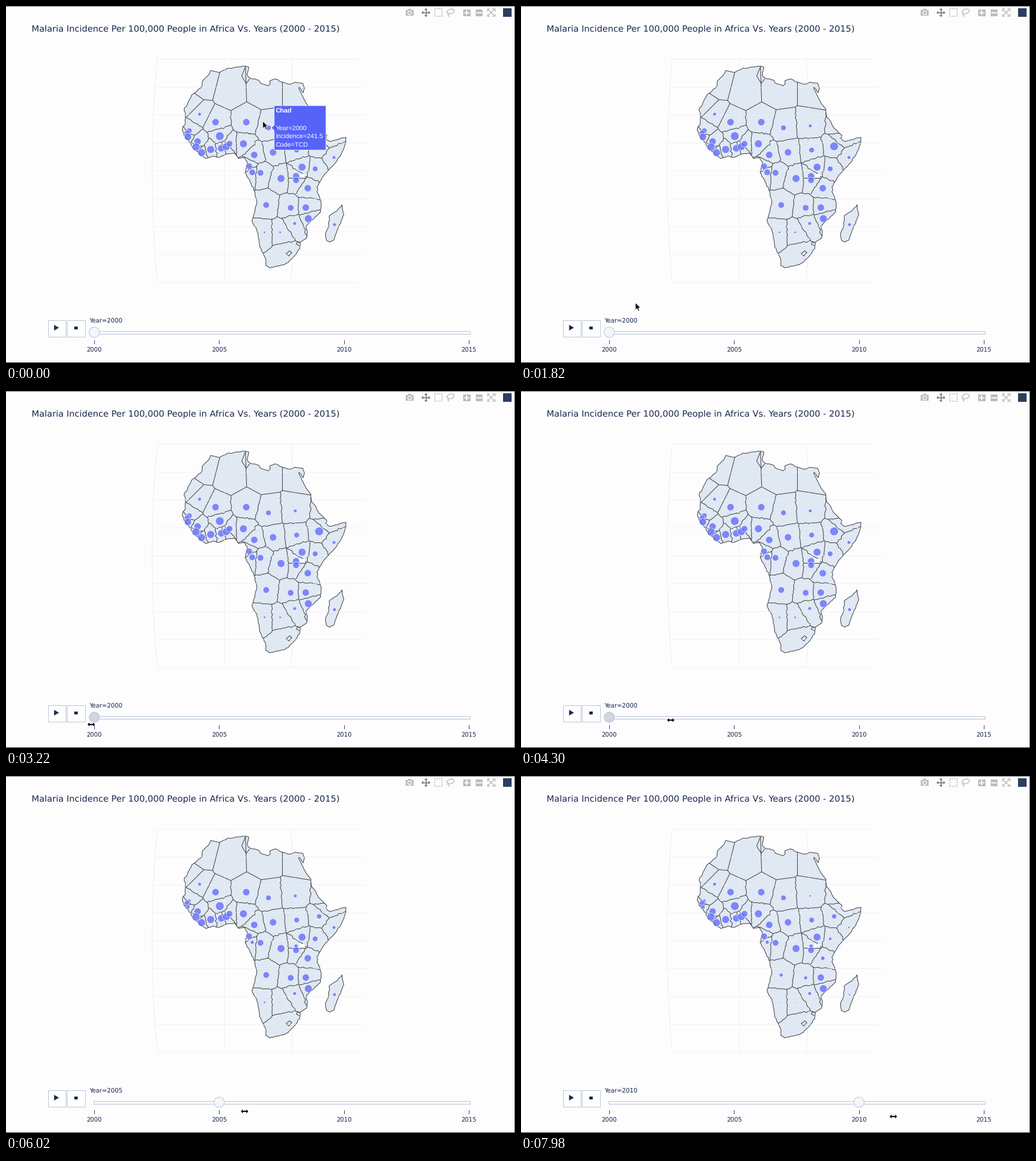
Recreate the animation shown at these times as a matplotlib script. Size 894 px wide and 627 px high, loop 8000 ms.

```python
from itertools import combinations

import numpy as np
import matplotlib.pyplot as plt
from matplotlib.animation import FuncAnimation
from matplotlib.collections import LineCollection
from matplotlib.patches import Circle, Ellipse, Polygon, Rectangle

plt.rcParams["text.hinting"] = "no_hinting"
W, H, DPI = 894, 627, 64
STEP, LOOP = 40, 8000
PT = 72 / DPI
INK, PALE, LAND, BORDER = "#182850", "#b8c4d8", "#dfe8f3", "#383838"
BLUE, GREY = "#5663f9", "#bcbcbe"
rng = np.random.default_rng(4)

# Key points of the coast: longitude, latitude
COAST_EAST = [
    -5.9, 35.8, -2, 35.1, 1.5, 36.6, 9.8, 37.3, 11, 37, 10.2, 34.3, 11.3, 33.1,
    15.2, 32.3, 15.8, 31.3, 19.1, 30.3, 20.1, 31, 20, 32.1, 22.5, 32.8, 25, 31.7,
    29, 30.9, 31, 31.6, 34.3, 31.2, 34.9, 29.5, 34.2, 27.8, 32.4, 29.9,
    34.1, 26.1, 35.6, 23.6, 37, 22, 37.2, 19.2, 38.4, 18, 39.8, 15.4, 43.2, 12.6,
    42.8, 11.6, 44.3, 10.4, 47, 11, 51.2, 11.9, 50.6, 9.2, 48.6, 5.3, 46.6, 2.9,
    41.6, -1.7, 38.8, -5.9, 39.4, -8.5, 40.6, -11, 40.7, -14.8, 37.4, -17.6,
    34.8, -19.9, 35.5, -22.1, 35.4, -24.1, 32.7, -25.7, 32.7, -28]
COAST_WEST = [
    30.1, -31.1, 26.4, -33.7, 20.1, -34.8, 18.4, -34, 18.2, -31.7, 15.3, -27.2,
    14.4, -22.4, 11.8, -17.8, 13.7, -12, 13.7, -10.7, 12.9, -8.8, 12.2, -6,
    8.8, -.8, 9.7, 3, 8.5, 4.7, 6, 4.3, 4.3, 6.3, 1.1, 5.9, -2, 4.7, -4.6, 5.2,
    -7.6, 4.3, -12.9, 7.8, -15, 11, -16.8, 12.6, -17.6, 14.7, -16.4, 16.5,
    -16.4, 20.5, -17, 21.5, -14.8, 25.5, -13.1, 27.6, -9.7, 29.9, -9.5, 32,
    -6.9, 34.1, -5.9, 35.8]
ISLAND = [49.5, -12.2, 50.5, -15.8, 49.5, -18, 47.1, -24.9, 45.4, -25.6, 44, -25,
          43.3, -22.5, 44.4, -20, 44.4, -16.2, 48, -13.9, 49.5, -12.2]

# Country centres in pixels; they place the bubbles and shape the borders
CENTRES = dict(
    MRT=(340, 190), MLI=(368, 204), NER=(422, 204), TCD=(461, 214), SDN=(508, 210.5),
    SEN=(322, 219), GMB=(318, 223), GNB=(319.5, 230), GIN=(336.5, 238),
    SLE=(333.5, 247.5), LBR=(343.5, 257.5), CIV=(359.5, 252), GHA=(378, 250),
    TGO=(387, 247), BEN=(392.5, 242), BFA=(375.5, 228.5), NGA=(417, 242),
    CMR=(436, 261.5), CAF=(469, 257), SSD=(510.5, 253), ETH=(550, 246.5),
    DJI=(562, 232), SOM=(576, 266), KEN=(543, 286), UGA=(520, 283),
    RWA=(509.5, 299), BDI=(509.5, 306), TZA=(530, 320), COD=(483, 303),
    COG=(447, 293), GAB=(432.5, 292), GNQ=(427, 281.5), AGO=(457, 349.5),
    ZMB=(500, 354.5), MWI=(526.5, 354), MOZ=(531, 373.5), ZWE=(507, 382),
    NAM=(454, 397.5), BWA=(481.5, 397.5), MDG=(577, 384))
UNMARKED = dict(MAR=(345, 138), ESH=(322, 172), DZA=(392, 150), LBY=(452, 148),
                EGY=(518, 148), ERI=(560, 214), ZAF=(490, 437))
BURDEN = {7.2: "BFA ETH", 6.5: "SLE LBR CIV TGO NGA UGA COD MOZ",
          5.4: "BEN BDI COG GAB GNQ AGO ZMB", 4.6: "TCD SEN GMB SSD KEN",
          2.9: "MRT SDN SOM ZWE MDG", 1.8: "NAM BWA DJI"}
DECLINES = {2005: "SEN GNB ETH GAB RWA BWA DJI",
            2010: "AGO KEN SOM SDN TZA ZMB MDG NAM"}
YEARS = (2000, 2005, 2010)
STOPS = {year: 155 + 43.87 * (year - 2000) for year in (*YEARS, 2015)}

# Pointer keys: time, x, y
KEYS = np.array([
    (0, 451, 202), (490, 452, 205), (510, 410, 225), (700, 382, 252),
    (960, 377, 257), (1150, 372, 272), (1820, 201, 521), (2240, 164, 570),
    (2600, 152, 583), (3300, 149.5, 586), (4300, 263, 578), (6020, 419, 589),
    (7980, 654, 598)])
ARROW = np.array([(0, 0), (0, 13), (3, 10.3), (5, 15), (7, 14.2), (5, 9.6), (9, 9.4)])
QUARTER = np.array([(7, 0), (2.8, 4.6), (2.8, 1.5)])
RESIZE = np.vstack([QUARTER, QUARTER[:0:-1] * (-1, 1), QUARTER * (-1, -1),
                    QUARTER[:0:-1] * (1, -1)])
TIPS = [(0, 500, "TCD", 10, "Chad", 241.5), (690, 1140, "GHA", 12, "Ghana", 488.1)]

fig = plt.figure(figsize=(W / DPI, H / DPI), dpi=DPI, facecolor="#fdfdfd")
ax = fig.add_axes([0, 0, 1, 1], xlim=(0, W), ylim=(H, 0))
ax.axis("off")


def project(lon, lat):
    lon, lat = np.asarray(lon, float), np.asarray(lat, float)
    return np.column_stack([383 + 4.21 * lon * (1 - .071 * (lat / 40) ** 2),
                            289 - 4.91 * lat])


def rough(pts, amount):
    """Split a polyline into short steps with a seeded wobble."""
    out = [pts[:1]]
    for a, b in zip(pts, pts[1:]):
        n = max(1, int(np.hypot(*(b - a)) / 3.5))
        part = a + (b - a) * np.linspace(0, 1, n + 1)[1:, None]
        part[:-1] += rng.normal(0, amount, (n - 1, 2))
        out.append(part)
    return np.vstack(out)


def borders(sites):
    """Edges halfway between neighbouring centres (Voronoi diagram)."""
    for a, b in combinations(sites, 2):
        mid, along = (a + b) / 2, (b - a)[::-1] * (-1, 1)
        along = along / np.hypot(*along)
        slope = 2 * (a - sites) @ along
        offset = 2 * (a - sites) @ mid + (sites ** 2).sum(1) - a @ a
        flat = abs(slope) < 1e-6
        if (offset[flat] < -1e-6).any():
            continue
        cut = -offset / np.where(flat, 1, slope)
        lo = max(cut[~flat & (slope > 0)], default=-90)
        hi = min(cut[~flat & (slope < 0)], default=90)
        lo, hi = max(lo, -90), min(hi, 90)
        if hi - lo > .5:
            edge = np.array([mid + lo * along, mid + hi * along])
            in_desert = edge[:, 1].mean() < 195
            yield edge if in_desert else rough(edge, .8)


def add(patch, z=5):
    patch.set_zorder(z)
    return ax.add_patch(patch)


def box(x0, y0, x1, y1, fill, edge="none", lw=1, z=5):
    return add(Rectangle((x0, y0), x1 - x0, y1 - y0, fc=fill, ec=edge, lw=lw * PT), z)


def stroke(xs, ys, color, lw=1, z=5, **kw):
    ax.plot(xs, ys, color=color, lw=lw * PT, zorder=z, **kw)


def label(x, y, text, px, color=INK, font="DejaVu Sans", z=6, **kw):
    return ax.text(x, y, text, fontsize=px * PT, color=color, family=font,
                   va="baseline", zorder=z, **kw)


def lines(paths, color, z, **kw):
    return ax.add_collection(LineCollection(paths, colors=color, linewidths=PT,
                                            zorder=z, **kw))


def draw_map():
    land = []
    for flat in (COAST_EAST + COAST_WEST, ISLAND):
        outline = rough(project(flat[::2], flat[1::2]), .5)
        land.append(add(Polygon(outline, fc=LAND, ec=BORDER, lw=PT), 1))
    sites = np.array([c for code, c in {**CENTRES, **UNMARKED}.items() if code != "MDG"],
                     float)
    lines(list(borders(sites)), BORDER, 2).set_clip_path(land[0])
    lines([[(420, 108), (414, 123), (422, 136), (428, 128)],
           [(492, 435), (498, 430), (502, 433), (497, 439), (492, 435)],
           [(515, 421), (510, 418), (512, 414), (515, 416)]], BORDER, 2)
    box(514.5, 295, 525, 301, "#fdfdfd", z=2.5)

    lats = np.linspace(-40, 40, 41)
    grid = [project(np.full(41, lon), lats) for lon in (-30, 0, 30)]
    grid += [project([-30, 60], [lat, lat]) for lat in range(-40, 41, 10)]
    lines(grid, "#ececea", .5)
    lines(grid, "#f2f4f6", 3, alpha=.5)


def draw_toolbar():
    box(702, 7, 716, 17, GREY)
    box(706, 5, 712, 8, GREY)
    add(Circle((709, 12), 3.2, fc=GREY, ec="white", lw=1.4 * PT))
    dark, centre = "#77787c", np.array([737.5, 11.5])
    stroke([731, 744], [11.5, 11.5], dark, 1.6)
    stroke([737.5, 737.5], [5, 18], dark, 1.6)
    for dx, dy in ((1, 0), (-1, 0), (0, 1), (0, -1)):
        tip, side = np.array([dx, dy]), np.array([dy, dx])
        base = centre + 4.5 * tip
        add(Polygon([centre + 7.5 * tip, base + 3 * side, base - 3 * side], fc=dark))
    stroke([753, 766, 766, 753, 753], [5, 5, 18, 18, 5], GREY, 1.6, ls=(0, (1.3, 1)))
    add(Ellipse((781, 9.5), 13, 8, angle=-15, fc="none", ec=GREY, lw=1.5 * PT))
    stroke([776, 777.5, 776, 778], [12, 14, 15.5, 18], GREY, 1.5)
    for x in (809, 830.5):
        box(x - 6, 5.5, x + 6.5, 17.5, GREY)
        stroke([x - 3.5, x + 4], [11.5, 11.5], "white", 2)
    stroke([809.2, 809.2], [8, 15], "white", 2)
    for s in (-1, 1):
        stroke([847, 857], [11.5 - 5 * s, 11.5 + 5 * s], GREY, 1.5)
        for v in (-1, 1):
            stroke([852 + 3 * s, 852 + 6.5 * s, 852 + 6.5 * s],
                   [11.5 + 6.5 * v, 11.5 + 6.5 * v, 11.5 + 3 * v], GREY, 1.5)
    box(873, 4, 888, 18.5, "#2a3f5f")


def draw_controls():
    label(45, 45, "Malaria Incidence Per 100,000 People in Africa Vs. Years (2000 - 2015)",
          15.4)
    for x0, x1 in ((73.5, 104.5), (106.5, 138.5)):
        box(x0, 551.5, x1, 580.5, "#fefefe", PALE)
    add(Polygon([(84.5, 560), (84.5, 570), (93, 565)], fc=INK))
    box(119.5, 562.5, 125.5, 568, INK)
    box(153.5, 570.5, 814.5, 575.5, "#f8fafc", PALE)
    for year, x in STOPS.items():
        stroke([x, x], [587, 592.5], "#333b4d")
        label(x, 607, str(year), 10.6, ha="center")
    box(0, 0, W, 1, "#6a6a6a")
    box(0, 625.6, W, H, "#101010")
    box(893, 0, W, H, "#55565a")


def radius(code, year):
    size = next((r for r, codes in BURDEN.items() if code in codes), 6)
    fell = any(year >= since and code in codes for since, codes in DECLINES.items())
    return size * (.58 if fell else 1) + .2


draw_map()
draw_toolbar()
draw_controls()
areas = {year: [(2 * radius(code, year) * PT) ** 2 for code in CENTRES]
         for year in YEARS}
bubbles = ax.scatter(*zip(*CENTRES.values()), s=1, fc=[(.388, .431, .98, .8)],
                     ec=[(1, 1, 1, .8)], linewidths=.8 * PT, zorder=4)
year_text = label(146.5, 556, "", 10.6)
handle = add(Circle((155, 573), 9, ec=PALE, lw=PT), 7)
tip_box = add(Polygon([(0, 0)], fc=BLUE, ec="white", lw=.8 * PT), 8)
tip_lines = [label(0, 0, "", 11.4, "white", "Liberation Sans", 9,
                   weight="normal" if i else "bold") for i in range(4)]
pointer = add(Polygon([(0, 0)], fc="black", ec="white", lw=.8 * PT), 10)


def show_tip(t):
    tip = next((tip for tip in TIPS if tip[0] <= t < tip[1]), None)
    for artist in (tip_box, *tip_lines):
        artist.set_visible(tip is not None)
    if tip is None:
        return
    _, _, code, gap, name, value = tip
    x, y = CENTRES[code]
    left, right, top, bottom = x + gap, x + gap + 91, y - 39, y + 39
    tip_box.set_xy([(left - 5, y), (left, y - 5), (left, top), (right, top),
                    (right, bottom), (left, bottom), (left, y + 5)])
    rows = (name, 13), ("Year=2000", 43), (f"Incidence={value}", 58), (f"Code={code}", 73)
    for line, (text, dy) in zip(tip_lines, rows):
        line.set_text(text)
        line.set_position((left + 2.5, top + dy))


def update(i):
    t = i * STEP + STEP / 2
    x, y = (np.interp(t, KEYS[:, 0], KEYS[:, k]) for k in (1, 2))
    year = 2000
    if t > 3300:
        year = min(YEARS, key=lambda stop: abs(STOPS[stop] - x))
    pressed = t > 2900 and year == 2000

    bubbles.set_sizes(areas[year])
    year_text.set_text(f"Year={year}")
    handle.center = STOPS[year], 573
    handle.set_facecolor("#d2d5da" if pressed else "#f3f6fa")
    pointer.set_xy((RESIZE if y > 563 else ARROW) + (x, y))
    show_tip(t)
    return bubbles, year_text, handle, pointer, tip_box, *tip_lines


anim = FuncAnimation(fig, update, frames=LOOP // STEP, interval=STEP,
                     repeat=True, repeat_delay=0)
plt.show()
```
